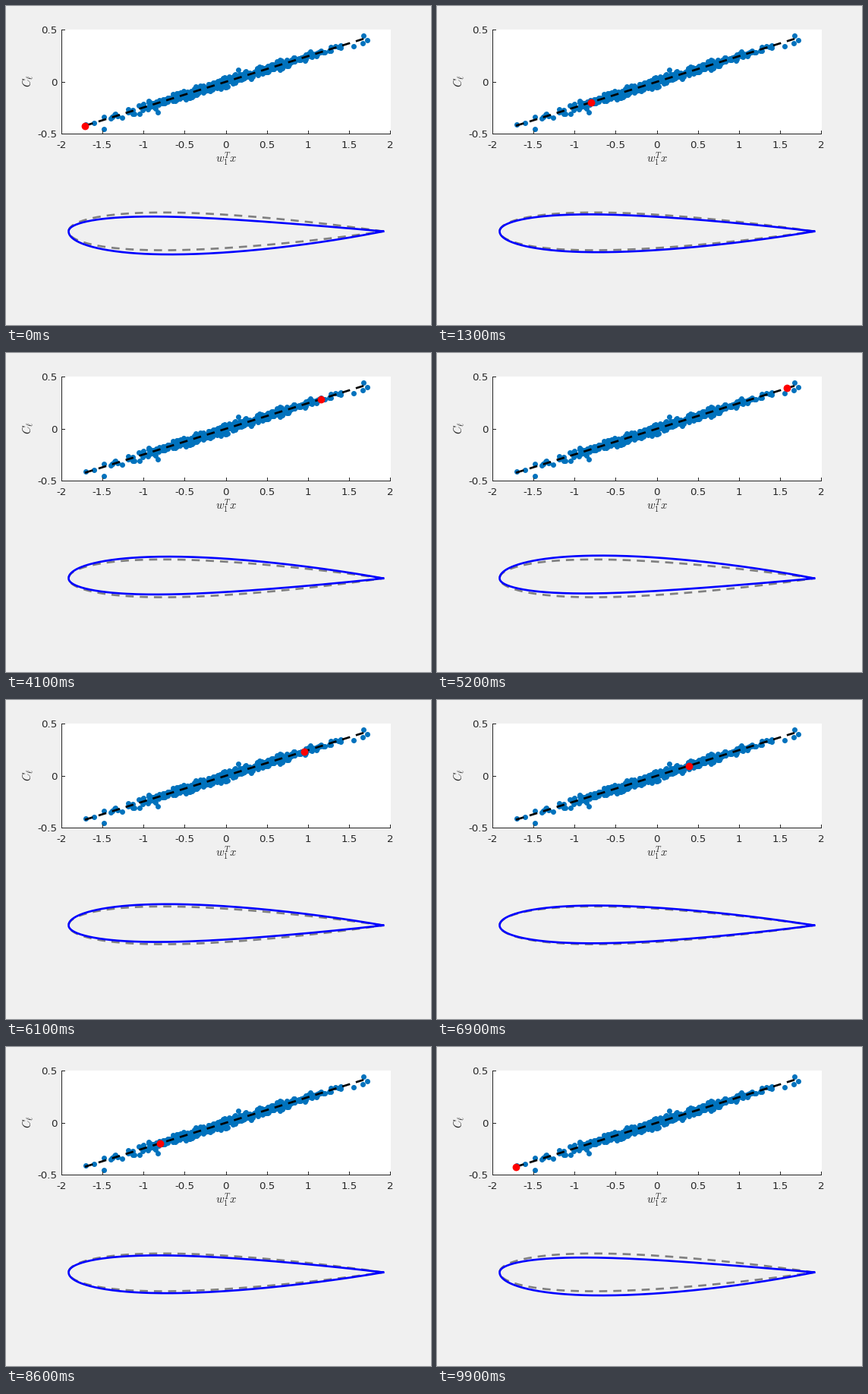
Animation of 560x420 px, one loop 10000 ms. Source, as a matplotlib script:

```python
import numpy as np
import matplotlib.pyplot as plt
from matplotlib.animation import FuncAnimation
from matplotlib.patches import Rectangle

W, H, DPI = 560, 420, 100
PX = 72 / DPI                 # points per pixel
STEPS = 50
X_MIN, X_MAX, SLOPE = -1.71, 1.72, 0.245
DARK = "0.15"
THICK = 2.67 * PX
DASHED = dict(lw=THICK, ls=(0, (4, 3)), dash_capstyle="butt")

plt.rcParams["font.family"] = "DejaVu Sans"
plt.rcParams["mathtext.fontset"] = "cm"

fig = plt.figure(figsize=(W / DPI, H / DPI), dpi=DPI, facecolor="#f0f0f0")
ax = fig.add_axes([0, 0, 1, 1])
ax.set_xlim(0, W)
ax.set_ylim(H, 0)
ax.axis("off")


def to_x(v):
    return 289.6 + 108.5 * v


def to_y(v):
    return 99.8 - 138 * v


def line(x, y, **style):
    return ax.plot(x, y, **style)[0]


def thin(x, y):
    line(x, y, color=DARK, lw=PX, snap=False, solid_capstyle="butt", zorder=4)


def dots(x, y, size, color, zorder):
    return line(x, y, ls="none", marker="o", ms=size * PX, mew=0,
                color=color, zorder=zorder)


def draw_axes():
    left, right, top, bottom = 73.5, 507, 31, 168.5
    ax.add_patch(Rectangle((73, 31), 434, 138, fc="white", ec="none", zorder=0))
    thin([73, right], [bottom, bottom])
    thin([left, left], [top, 169])

    text = dict(color=DARK, fontsize=13.33 * PX, va="baseline")
    for v in np.arange(-2, 2.1, 0.5):
        x = min(round(to_x(v)), 506) + 0.5
        thin([x, x], [bottom, bottom - 4.5])
        ax.text(to_x(v), 186.6, f"{v:g}", ha="center", **text)
    for v in (-0.5, 0, 0.5):
        y = round(to_y(v)) - 0.5 + (v >= 0)
        thin([left, left + 4.5], [y, y])
        ax.text(67.7, y + 4.8, f"{v:g}", ha="right", **text)

    label = dict(color=DARK, fontsize=14.67 * PX, ha="center", va="center")
    ax.text(290, 201, r"$w_1^Tx$", **label)
    ax.text(29.5, 99, r"$C_\ell$", rotation=90, **label)


def draw_samples():
    rng = np.random.default_rng(4)
    x = rng.normal(0, 0.62, 540)
    x = x[abs(x) < 1.42]
    noise = np.clip(rng.normal(0, 0.019, x.size), -0.05, 0.045)
    dots(to_x(x), to_y(SLOPE * x + noise), 7, "#0072bd", 2)

    # the few samples that stand clear of the cloud
    strays = np.array([(-1.7, -0.41), (-1.6, -0.395), (-1.48, -0.335),
                       (-1.48, -0.45), (-0.83, -0.29), (0.15, 0.115),
                       (1.55, 0.34), (1.66, 0.37), (1.67, 0.44), (1.72, 0.4)])
    dots(to_x(strays[:, 0]), to_y(strays[:, 1]), 7, "#0072bd", 2)

    ends = np.array([X_MIN, X_MAX])
    line(to_x(ends), to_y(SLOPE * ends), color="black", zorder=5, **DASHED)


# chord positions, dense at both ends
s = (1 - np.cos(np.linspace(0, np.pi, 160))) / 2
half = 0.6 * (0.2969 * np.sqrt(s) - 0.126 * s - 0.3516 * s**2
              + 0.2843 * s**3 - 0.1036 * s**4)
bump = 0.01545 * np.sqrt(s) * (1 - s) * (1 + s)


def airfoil(v):
    """Closed outline from the trailing edge over the top and back."""
    chord = 414.5
    upper, lower = half + v * bump, -half + v * bump
    x = 82.5 + chord * np.r_[s[::-1], s[1:]]
    y = 296.7 - chord * np.r_[upper[::-1], lower[1:]]
    return x, y


draw_axes()
draw_samples()
line(*airfoil(0), color="0.5", zorder=2, **DASHED)
shape = line([], [], color="blue", lw=THICK, solid_joinstyle="round", zorder=3)
dot = dots([], [], 9.8, "red", 6)


def update(i):
    step = min(i, 2 * STEPS - 1 - i)
    v = X_MIN + (X_MAX - X_MIN) * step / (STEPS - 1)
    shape.set_data(*airfoil(v))
    dot.set_data([to_x(v)], [to_y(SLOPE * v)])
    return shape, dot


anim = FuncAnimation(fig, update, frames=2 * STEPS, interval=100,
                     repeat=True, repeat_delay=0)
plt.show()
```
